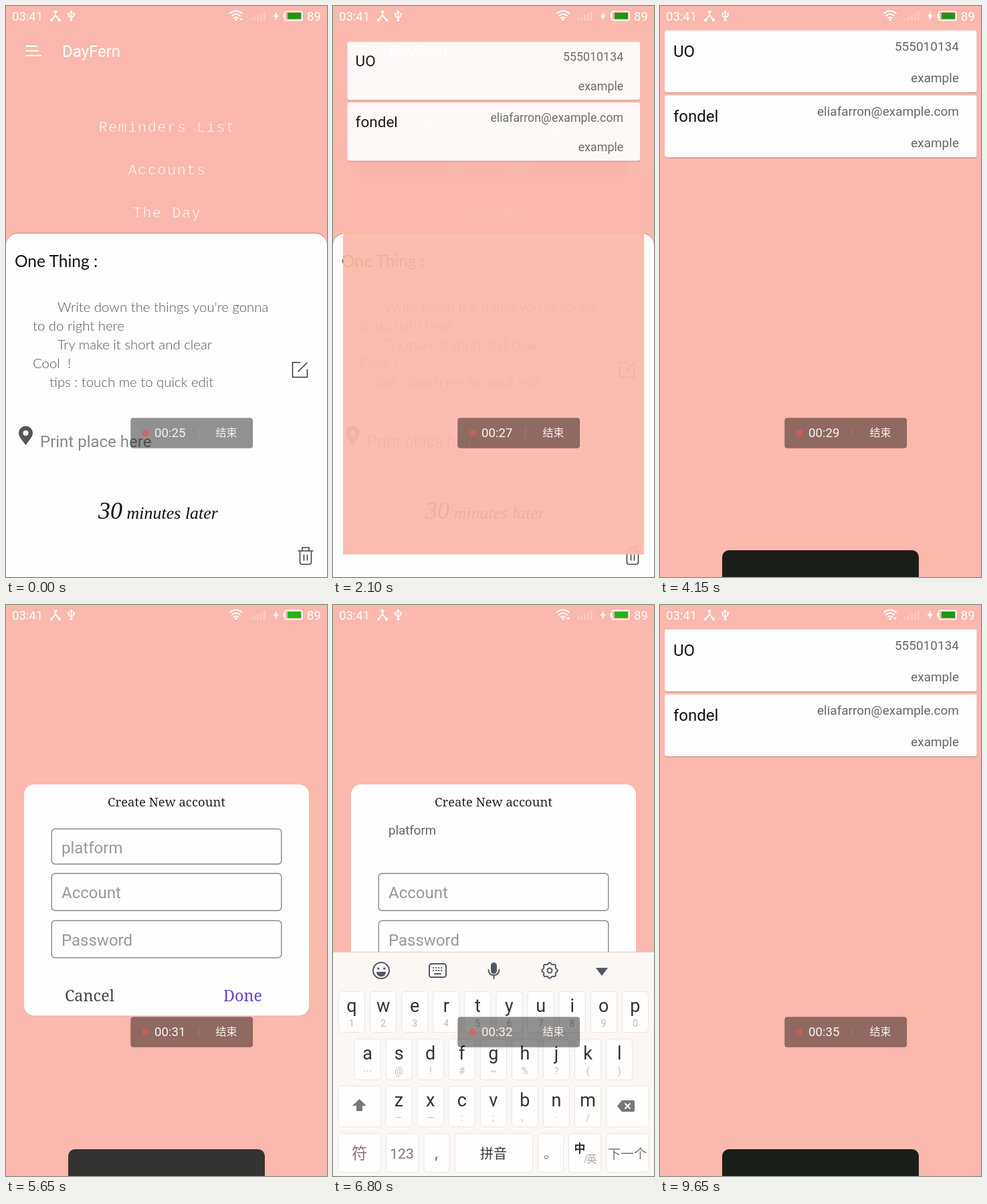
Animation, 480 px wide and 853 px high, one loop 9700 ms. Source, as an HTML page:

```html
<!DOCTYPE html>
<html lang="en">
<head>
<meta charset="utf-8">
<title>Accounts demo</title>
<style>
html, body { margin: 0; width: 100%; height: 100%; overflow: hidden; background: #fbb8ac; }
svg { display: block; width: 100%; height: 100%; }
text { font-family: Roboto, "Noto Sans CJK SC", "Noto Sans CJK", sans-serif; white-space: pre; }
.mono { font: 22px "Liberation Mono", monospace; letter-spacing: 1.45px; fill: #fff; stroke: #fbb8ac; stroke-width: .7; text-anchor: middle; }
.hand { font: 300 20.4px Lato, sans-serif; fill: #555; }
.serif { font-family: "Noto Serif", serif; font-size: 23.4px; }
.script { font: italic 26px "Liberation Serif", serif; fill: #111; }
.right { text-anchor: end; font-size: 19px; fill: #666; }
.mid { text-anchor: middle; }
.line { fill: none; stroke-linecap: round; stroke-linejoin: round; }
.field { fill: none; stroke: #888; stroke-width: 1.4; }
.hint { font-size: 24px; fill: #999; }
.key { fill: #fefefe; stroke: #ebe5e1; }
.letter { font-size: 27px; fill: #333; text-anchor: middle; }
.sub { font-size: 14px; fill: #bbb; text-anchor: middle; }
.touch { fill: #fff; fill-opacity: .5; stroke: #ddd; stroke-opacity: .7; stroke-width: 1.5; }
</style>
</head>
<body>
<svg viewBox="0 0 480 853" preserveAspectRatio="none">
  <rect width="480" height="853" fill="#fbb8ac"/>

  <g id="home">
    <path class="line" d="M30 60H46M30 67H48.500M30 74H52" stroke="#fff" stroke-width="2.2"/>
    <text x="84" y="76" font-size="24" fill="#fff">DayFern</text>
    <rect id="press" x="40" y="222" width="400" height="47" rx="2" opacity="0"/>
    <text class="mono" x="241" y="188">Reminders List</text>
    <text class="mono" x="241" y="252">Accounts</text>
    <text class="mono" x="241" y="316">The Day</text>
    <rect y="338.5" width="480" height="540" rx="18" fill="#d99a90"/>
    <rect y="340" width="480" height="540" rx="18" fill="#fefefe"/>
    <text class="hand" x="13" y="390" style="font-size:24.5px;font-weight:400;fill:#111">One Thing :</text>
    <text class="hand" x="77" y="457">Write down the things you're gonna</text>
    <text class="hand" x="40" y="485">to do right here</text>
    <text class="hand" x="77" y="513">Try make it short and clear</text>
    <text class="hand" x="40" y="541">Cool  !</text>
    <text class="hand" x="65" y="569">tips : touch me to quick edit</text>
    <path class="line" d="M440 532.5H428.5V554.5H450.5V543M437 546L450 533" stroke="#333" stroke-width="1.5"/>
    <path d="M29.500 656C25.500 650 19 644 19 638A10.500 10.500 0 0 1 40 638C40 644 33.500 650 29.500 656Z" fill="#555"/>
    <circle cx="29.500" cy="638" r="4" fill="#fff"/>
    <text x="51" y="659" font-size="24" fill="#888">Print place here</text>
    <text class="script" x="138" y="766"><tspan font-size="36">30</tspan> minutes later</text>
    <path class="line" d="M437 814H459M443 814V809H453V814M439.500 814V831Q439.500 834 442.500 834H453.500Q456.500 834 456.500 831V814M445.500 820V828M450.500 820V828" stroke="#444" stroke-width="1.6"/>
  </g>

  <g id="accounts">
    <rect width="480" height="853" fill="#fbb8ac"/>
    <g id="cards"></g>
  </g>

  <g id="panel"><rect id="panelBox" x="93" y="813" width="294" height="60" rx="10"/></g>

  <g id="dialog">
    <rect x="27" y="269.500" width="426" height="345" rx="15" fill="#cdbcb4"/>
    <rect x="27" y="268" width="426" height="345.500" rx="15" fill="#fefefe"/>
    <text class="serif mid" x="240" y="301" style="font-size:18.5px" fill="#222">Create New account</text>
    <rect id="firstField" class="field" x="68.300" y="334.500" width="343.500" height="52.500" rx="5"/>
    <rect class="field" x="68.300" y="401" width="343.500" height="55.500" rx="5"/>
    <rect class="field" x="68.300" y="471.500" width="343.500" height="55.500" rx="5"/>
    <text id="label" x="83"></text>
    <text class="hint" x="83" y="438">Account</text>
    <text class="hint" x="83" y="509">Password</text>
    <text class="serif" x="88" y="592" fill="#444">Cancel</text>
    <text class="serif" x="325" y="592" fill="#6a3fc8">Done</text>
  </g>

  <g id="keyboard">
    <rect y="518" width="480" height="335" fill="#fbf7f4"/>
    <path d="M0 518.500H480" stroke="#d8ccc6"/>
    <g class="line" stroke="#555766" stroke-width="2">
      <circle cx="72" cy="546" r="12"/>
      <path d="M66 549H78Q77 554 72 554Q67 554 66 549Z" fill="#555766"/>
      <path d="M67.500 543H68M76.500 543H77" stroke-width="3"/>
      <rect x="144" y="536" width="25" height="20" rx="3.500"/>
      <path d="M150 542H150.500M154 542H154.500M158 542H158.500M162 542H162.500M150 546H150.500M154 546H154.500M158 546H158.500M162 546H162.500M152 551H161"/>
      <rect x="237" y="535" width="7" height="15" rx="3.500" fill="#555766"/>
      <path d="M232.500 545Q233 553 240.500 553Q248 553 248.500 545M240.500 553V558"/>
      <path id="gear"/>
      <circle cx="324" cy="546" r="3.500"/>
    </g>
    <path id="arrow" d="M393 542H411L402 554Z"/>
    <g id="keys"></g>
    <path d="M39.500 738L50 748H44V756H35V748H29Z" fill="#777"/>
    <path d="M425 748.500L432 740H449Q451 740 451 742V755Q451 757 449 757H432Z" fill="#777"/>
    <path class="line" d="M437 745L444 752M444 745L437 752" stroke="#fff" stroke-width="2"/>
  </g>

  <g id="touches"></g>

  <g>
    <rect x="186.500" y="615.500" width="182.500" height="45" rx="4" fill="#000" fill-opacity=".43" stroke="#000" stroke-opacity=".1"/>
    <circle id="dot" cx="208.700" cy="638" r="5.300" fill="#dc5c58"/>
    <text id="timer" x="222" y="644" font-size="18.700" fill="#f6f2f0"></text>
    <path d="M288 630V645" stroke="#fff" stroke-opacity=".15"/>
    <text x="313.500" y="643" font-size="16" fill="#f6f2f0">结束</text>
  </g>

  <g fill="#fff">
    <text x="9" y="22" font-size="18.500">03:41</text>
    <path class="line" d="M74 8V14L68 21M74 14L80 21" stroke="#fff" stroke-width="2"/>
    <path d="M71.500 7H76.500V10H71.500ZM66 19H70V23H66ZM78 19H82V23H78Z"/>
    <path class="line" d="M97.500 9V21M93.500 12V15L97.500 18L101.500 15V12" stroke="#fff" stroke-width="1.600"/>
    <path d="M97.500 6L100 10H95ZM92 10.500H95V13.500H92ZM100 10.500H103V13.500H100Z"/><circle cx="97.500" cy="21" r="2"/>
    <path class="line" d="M335 11Q344 3.500 353 11M338 14.500Q344 9.500 350 14.500M341 18Q344 15.500 347 18" stroke="#fff" stroke-width="2"/>
    <circle cx="344" cy="20.500" r="1.700"/>
    <path id="traffic" d="M349 18.500H354.500L351.800 22.500Z"/>
    <path d="M365 18H368V22H365ZM370 16H373V22H370ZM375 13.500H378V22H375ZM380 11H383V22H380ZM385 8H388V22H385Z" opacity=".25"/>
    <path d="M405 8L399.500 16H403L402 22L408 13.500H404.500Z"/>
    <rect x="417" y="8" width="26" height="13.500" rx="2.500" fill="none" stroke="#fff" stroke-width="1.500"/>
    <rect x="414.500" y="12" width="2.500" height="5.500"/>
    <rect id="charge" x="421" y="10" width="20" height="9.500"/>
    <text x="450" y="22" font-size="18.500">89</text>
  </g>
</svg>
<script>
const LOOP = 9700;
const $ = id => document.getElementById(id);
const set = (id, attrs) => Object.entries(attrs).forEach(([name, value]) => $(id).setAttribute(name, value));
const mix = (a, b, p) => a + (b - a) * p;
const ramp = (t, from, to) => Math.min(1, Math.max(0, (t - from) / (to - from)));
const smooth = p => p * p * (3 - 2 * p);
const easeOut = (p, power = 3) => 1 - (1 - p) ** power;
const hold = (t, from, to, fade = 80) => Math.min(ramp(t, from, from + fade), 1 - ramp(t, to - fade, to));

const card = (y, name, account) => `
  <rect x="7" y="${y + 1}" width="466.500" height="93" rx="3" fill="#cf988e"/>
  <rect x="7" y="${y}" width="466.500" height="92.500" rx="3" fill="#fefefe"/>
  <text x="20" y="${y + 39.5}" font-size="24" fill="#111">${name}</text>
  <text class="right" x="447" y="${y + 30.5}">${account}</text>
  <text class="right" x="447" y="${y + 77}">example</text>`;
$('cards').innerHTML = card(36.5, 'UO', '555010134') + card(133.5, 'fondel', 'eliafarron@example.com');

const box = (x, y, w, h) => `<rect class="key" x="${x + .5}" y="${y + .5}" width="${w}" height="${h}" rx="5"/>`;
const row = (x, y, letters, subs) => [...letters].map((letter, i) => {
  const left = x + i * 47.1;
  return box(left, y, 39, 61) +
    `<text class="letter" x="${left + 20}" y="${y + 31}">${letter}</text>` +
    `<text class="sub" x="${left + 20}" y="${y + 53}">${subs[i]}</text>`;
}).join('');
const wideKey = (x, w, label, size, color) => box(x, 789, w, 58) +
  `<text class="mid" x="${x + w / 2}" y="827" font-size="${size}" fill="${color}">${label}</text>`;
$('keys').innerHTML =
  row(8, 577, 'qwertyuiop', '1234567890') +
  row(31.5, 648, 'asdfghjkl', '⋯@!#~%?()') +
  row(78.5, 718, 'zxcvbnm', '–—:;、·/') +
  box(8, 718, 63, 61) + box(408.5, 718, 63, 61) +
  wideKey(8, 63, '符', 23, '#86706c') + wideKey(79, 48, '123', 21, '#86706c') +
  wideKey(135.5, 38, ',', 25, '#86706c') + wideKey(182, 116, '拼音', 20, '#333') +
  wideKey(306, 38, '。', 20, '#86706c') + box(352, 789, 48, 58) +
  wideKey(408.5, 63, '下一个', 19.5, '#86706c') +
  `<text class="mid" x="369" y="818" font-size="17" font-weight="700" fill="#333">中</text>
   <text class="mid" x="383" y="833" font-size="15" fill="#aaa"><tspan x="378">/</tspan><tspan x="387">英</tspan></text>`;

const gearPoints = Array.from({ length: 48 }, (_, i) => {
  const angle = i * Math.PI / 24, r = 10.7 + 1.2 * Math.cos(8 * angle);
  return `${324 + r * Math.cos(angle)} ${546 + r * Math.sin(angle)}`;
});
set('gear', { d: `M${gearPoints.join('L')}Z` });

const taps = [
  { x: 240, y: 245, from: 1650, to: 1900 },
  { x: 240, y: 835, from: 4250, to: 4450 },
  { x: 240, y: 362, from: 5850, to: 6050 },
  { x: 401.5, y: 549, from: 7850, to: 8300 },
  { x: 130, y: 583, from: 8450, to: 8650 }
];
$('touches').innerHTML = taps.map(tap => `<circle class="touch" cx="${tap.x}" cy="${tap.y}" r="14.500"/>`).join('');

function draw(t) {
  set('press', { opacity: .07 * ramp(t, 1650, 1800) });

  const scale = mix(.8, 1, easeOut(ramp(t, 1950, 2417)));
  set('accounts', {
    opacity: easeOut(ramp(t, 1950, 2150), 2),
    transform: `translate(240 309) scale(${scale}) translate(-240 -309)`
  });

  const dialog = smooth(ramp(t, 4450, 4850)) * (1 - smooth(ramp(t, 8650, 9050)));
  set('cards', { opacity: 1 - dialog });
  set('dialog', { opacity: dialog });
  set('panel', { transform: `translate(0 ${42 * (1 - easeOut(ramp(t, 3300, 3900)))})` });
  set('panelBox', { fill: `rgb(${mix(25, 51, dialog)},${mix(31, 51, dialog)},${mix(24, 51, dialog)})` });

  const focus = smooth(ramp(t, 5900, 6100));
  const grey = mix(153, 100, focus);
  $('label').textContent = 'platform';
  set('label', { y: mix(370.5, 343, focus), 'font-size': mix(24, 18.7, focus), fill: `rgb(${grey},${grey},${grey})` });
  set('firstField', { opacity: 1 - focus });

  const open = easeOut(ramp(t, 6050, 6400)) * (1 - smooth(ramp(t, 8050, 8295)));
  set('keyboard', { transform: `translate(0 ${336 * (1 - open)})` });
  set('arrow', { fill: t > 7850 ? '#7040d0' : '#555766' });

  taps.forEach((tap, i) => $('touches').children[i].setAttribute('opacity', hold(t, tap.from, tap.to)));

  $('timer').textContent = `00:${25 + Math.floor((t + 750) / 1000)}`;
  set('dot', { opacity: .7 + .05 * Math.cos(t * Math.PI / 500) });
  set('traffic', { opacity: t < 1000 || t > 6200 ? 1 : 0 });
  set('charge', { fill: dialog > .5 ? '#22b414' : '#1e9614' });
}

function tick() {
  draw(performance.now() % LOOP);
  requestAnimationFrame(tick);
}
tick();
</script>
</body>
</html>
```
